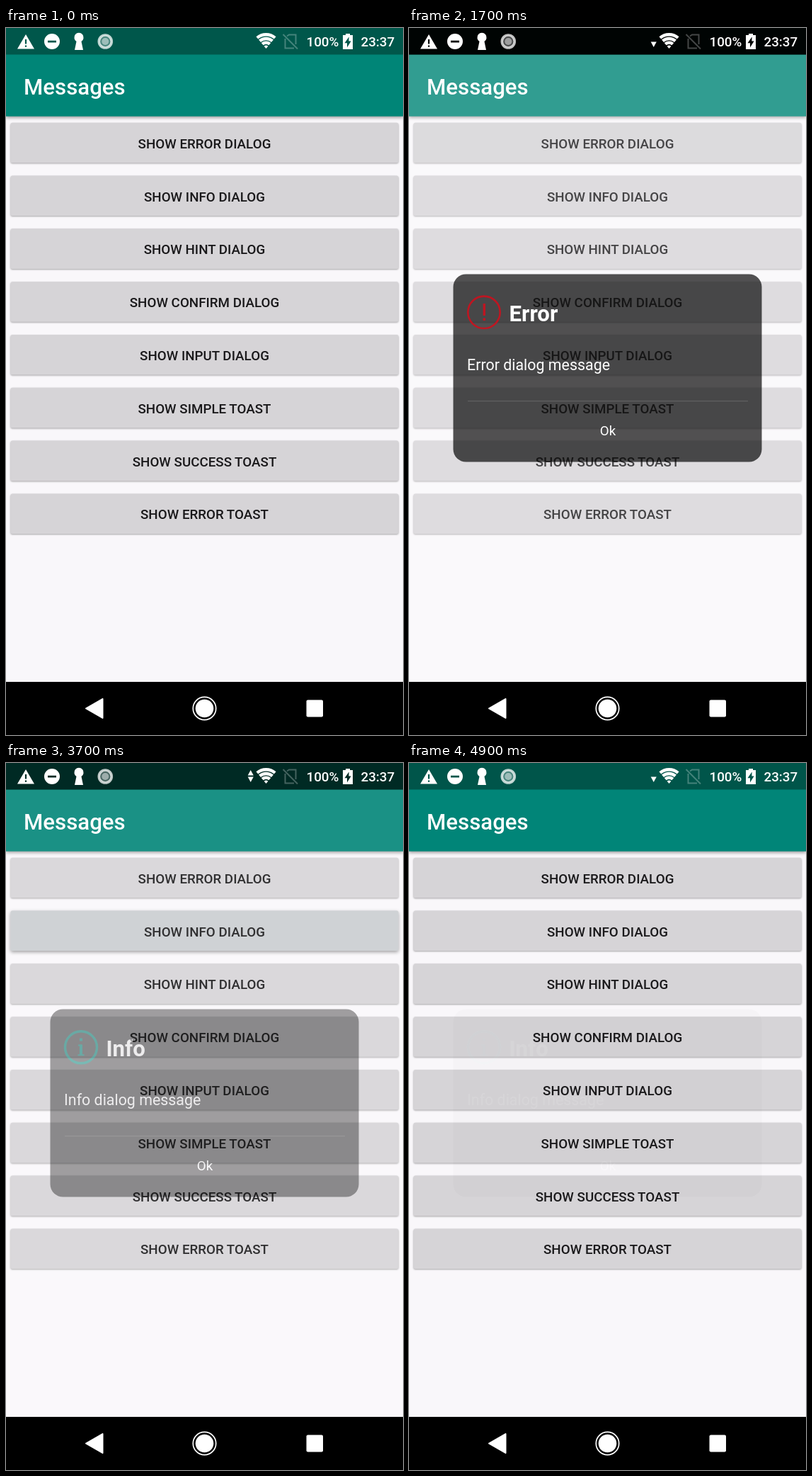
Recreate the animation shown at these times as an HTML page. Size 561 by 998 pixels, loop 5 s.

```html
<!DOCTYPE html>
<html lang="en">
<head>
<meta charset="utf-8">
<title>Messages</title>
<style>
html, body { margin: 0; width: 100%; height: 100%; overflow: hidden; background: #000; }
svg { display: block; width: 100vw; height: 100vh; font-family: Roboto, sans-serif; }
.label { font-size: 18.8px; font-weight: 500; }
.button { fill: #d6d4d7; filter: drop-shadow(0 1.5px 1.2px rgba(0, 0, 0, .34)); }
.bar { filter: drop-shadow(0 2px 2px rgba(0, 0, 0, .38)); }
</style>
</head>
<body>
<svg viewBox="0 0 561 998">
  <rect width="561" height="998" fill="#f9f7fa"/>
  <g id="buttons"></g>
  <rect class="bar" y="37" width="561" height="87.7" fill="#008577"/>
  <rect id="veil" y="37" width="561" height="886" fill="#fff"/>
  <text x="25" y="93.5" font-size="31.2" font-weight="500" fill="#fff">Messages</text>

  <rect width="561" height="37.5" fill="#00574b"/>
  <rect id="shade" width="561" height="37.5"/>
  <g fill="#fff" fill-rule="evenodd">
    <path d="M28 9L40 29.5H16ZM26.9 16V22.5H29.1V16ZM26.9 24.5V26.7H29.1V24.5Z"/>
    <path d="M54 19a11 11 0 1 0 22 0a11 11 0 1 0 -22 0ZM59 17.7H71V20.5H59Z"/>
    <path d="M99.5 19A6.6 6.6 0 1 1 106.5 19L109 31H97Z"/>
    <circle cx="140.3" cy="19" r="9" fill="#fff" fill-opacity=".3" stroke="#fff" stroke-opacity=".75" stroke-width="3.6"/>
    <circle cx="140.3" cy="19" r="5" fill-opacity=".45"/>
    <path id="down" d="M341.7 19.5H349.8L345.7 27Z"/>
    <path id="up" d="M341.7 17.5H349.8L345.7 10Z"/>
    <g id="wifi" fill="none" stroke="#fff" stroke-width="4.4"></g>
    <g fill="none" stroke="#fff" stroke-opacity=".27" stroke-width="2">
      <path d="M397 11.5L400 9.5H409.5V23M394.5 15V28.5H407"/>
      <path d="M391.5 9L412 29.5"/>
    </g>
    <path d="M480 8H486V10H490V30H476V10H480ZM484.6 12.5L478.5 21.3H482V27.5L487.6 18.5H484.4Z"/>
    <text class="label" x="424.5" y="26.2">100%</text>
    <text class="label" x="501.5" y="26.2">23:37</text>
  </g>

  <rect y="923" width="561" height="75"/>
  <g fill="#fff">
    <path d="M113 960.5L136.5 947V974Z" stroke="#fff" stroke-width="2" stroke-linejoin="round"/>
    <circle cx="280.5" cy="960.5" r="12.8"/>
    <circle cx="280.5" cy="960.5" r="16.2" fill="none" stroke="#fff" stroke-width="1.7"/>
    <rect x="424.5" y="948.5" width="23.5" height="24" rx="2"/>
  </g>

  <g id="dialog" fill="#fff">
    <rect x="62.5" y="347.5" width="436" height="265" rx="18" fill="#000" fill-opacity=".71"/>
    <g id="errorIcon" fill="none" stroke="#bd0d19">
      <circle cx="106" cy="401.3" r="22.7" stroke-width="2.6"/>
      <path d="M106.3 389V406M106.3 409.5V413" stroke-width="3.4"/>
    </g>
    <g id="infoIcon" fill="none" stroke="#007e72">
      <circle cx="106" cy="401.3" r="22.5" stroke-width="3.4"/>
      <path d="M106 388.5V392.5M106 397.5V413" stroke-width="4"/>
      <path d="M102 398.5H107M101.5 412.3H110.5" stroke-width="2"/>
    </g>
    <text id="heading" x="141.5" y="414" font-size="31.2" font-weight="700"></text>
    <text id="message" x="82" y="483" font-size="21.4"></text>
    <rect x="83" y="526" width="396" height="1.2" fill-opacity=".14"/>
    <text x="281" y="575" font-size="18.8" text-anchor="middle">Ok</text>
  </g>
</svg>
<script>
const LOOP = 5000, STEP = 100;
const get = id => document.getElementById(id);
const clamp = x => Math.max(0, Math.min(1, x));
const smooth = x => x * x * (3 - 2 * x);
const show = (id, on) => get(id).setAttribute('visibility', on ? 'visible' : 'hidden');
const setOpacity = (id, value) => get(id).setAttribute('opacity', value);

const labels = ['ERROR DIALOG', 'INFO DIALOG', 'HINT DIALOG', 'CONFIRM DIALOG',
  'INPUT DIALOG', 'SIMPLE TOAST', 'SUCCESS TOAST', 'ERROR TOAST'];
get('buttons').innerHTML = labels.map((label, i) => {
  const y = 133.7 + i * 74.82;
  const box = `x="6.5" y="${y}" width="548" height="56.6" rx="2.5"`;
  return `<rect id="button${i}" class="button" ${box}/>
    <clipPath id="clip${i}"><rect ${box}/></clipPath>
    <circle id="ripple${i}" cx="280" cy="${y + 28}" r="0" fill="#c5cacc" clip-path="url(#clip${i})"/>
    <text class="label" x="280.5" y="${y + 36}" text-anchor="middle" fill="#19181a">SHOW ${label}</text>`;
}).join('');

// Radial bands of the signal fan
const spread = 40 * Math.PI / 180;
get('wifi').innerHTML = [2.2, 8.3, 14, 19.7].map(r => {
  const dx = r * Math.sin(spread), y = 29 - r * Math.cos(spread);
  return `<path d="M${367.5 - dx} ${y}A${r} ${r} 0 0 1 ${367.5 + dx} ${y}"/>`;
}).join('');

const dialogs = [
  { name: 'Error', press: 1100, close: 2400 },
  { name: 'Info', press: 3300, close: 4500 }
];

function press(i, age) {
  const held = age >= 0 && age < 500;
  get('button' + i).style.filter = held ? 'drop-shadow(0 2px 2.4px rgba(0,0,0,.4))' : '';
  get('ripple' + i).setAttribute('r', 300 * clamp(age / 400));
  setOpacity('ripple' + i, .65 * clamp((700 - age) / 300));
}

function draw(t) {
  const current = dialogs[t < 3100 ? 0 : 1];
  const fadeIn = smooth(clamp((t - current.press - 120) / 550));
  const out = t > current.close ? clamp((t - current.close) * .0023 - .06) : 0;
  const alpha = fadeIn * (1 - out) ** 2;

  dialogs.forEach((d, i) => press(i, t - d.press));
  setOpacity('dialog', alpha);
  setOpacity('veil', alpha * .2);
  setOpacity('shade', alpha);
  get('heading').textContent = current.name;
  get('message').textContent = current.name + ' dialog message';
  show('errorIcon', current.name === 'Error');
  show('infoIcon', current.name === 'Info');
  show('down', t >= 1100 && t < 2100 || t >= 3100);
  show('up', t >= 3100 && t < 4100);
}

function tick() {
  draw(Math.floor(performance.now() % LOOP / STEP) * STEP);
  requestAnimationFrame(tick);
}
tick();
</script>
</body>
</html>
```
